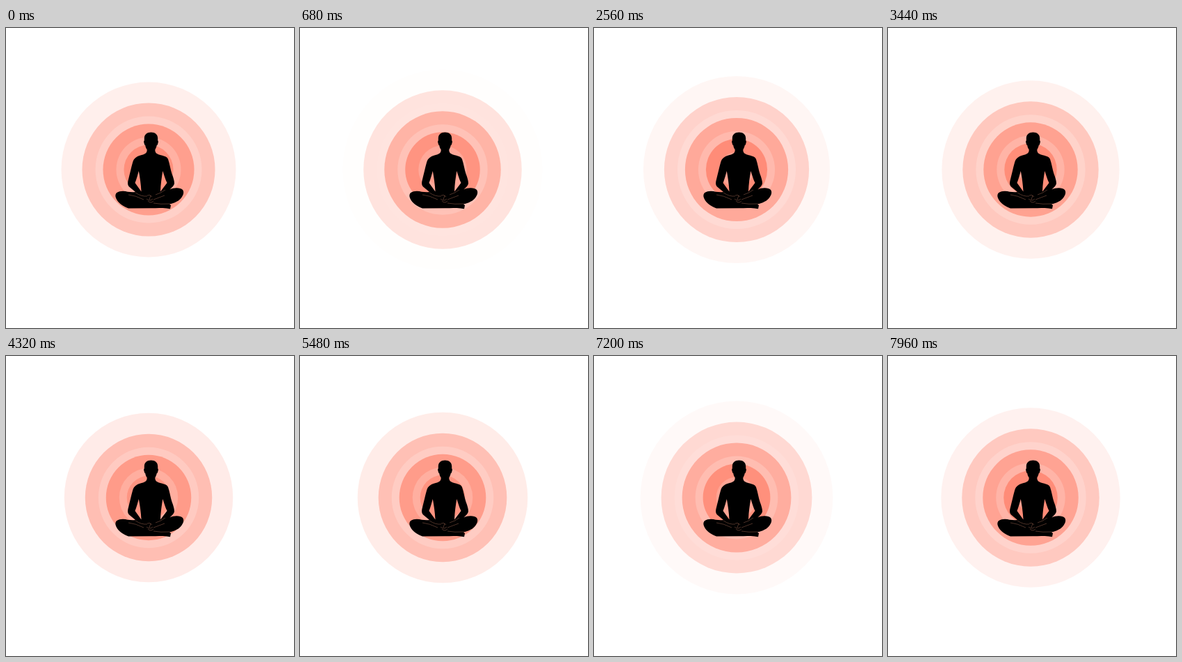
Animation, 414 px wide and 430 px high, one loop 8000 ms. Source, as an HTML page with a canvas:

```html
<!DOCTYPE html>
<html lang="en">
<head>
<meta charset="utf-8">
<title>Meditation ripples</title>
<style>
  html, body { margin: 0; width: 100%; height: 100%; overflow: hidden; background: #fff; }
  canvas { display: block; }
</style>
</head>
<body>
<canvas width="414" height="430"></canvas>
<script>
const ctx = document.querySelector('canvas').getContext('2d');
const LOOP = 8000, PERIOD = 1120;
const CENTER = [205, 203];
const GAP = 30, RIM = 19, START_RADIUS = 125.5;

// Ring opacity by radius: [radius, alpha]
const FADE = [[15, 0], [40, .52], [65, .45], [87, .36], [117, .148], [145, 0]];

const body = new Path2D(`
  M208.5 149.5 C214.5 149.5 218 152.5 218.2 158 L218.2 161 L219 163 L217.8 167.5
  L216.8 168 C216.3 171 215 173 214.3 174.5 C214.3 178.5 216 180 220 181.5
  C227 183.5 231.5 184 233 188 C235.5 195 236.5 203 238.5 209 C240.5 214 242 219 242 223
  C241.5 226 238 229 235.5 231.5 C241 228.5 251 228.5 254 232 C257 236 254 242 249.5 246
  C245 250 239 251.5 235 252.5 L237 254 L236 259.2 L231 258.5
  C222 257.5 216 258 209 258.3 L176 258.5 C168 256 159 249 157.5 242
  C156.5 236 161 234 168 233.7 C174 234 179 236 186 235
  L177 227.5 C174.5 225 174.8 221 176 217 C178 209 180 200 182 193
  C184 186 188 184 195 182 C201 180.5 202.7 178.5 202.7 174.5
  C201.5 172.5 200.6 171 200.2 168 L199.2 167.5 L198 163 L198.8 161 L198.8 158
  C199 152.5 202.5 149.5 208.5 149.5 Z
  M190.8 205 C189.5 210 187.5 217 185.5 222 L194.5 234.5 C194 224 192.5 214 190.8 205 Z
  M225.3 205 C223.8 214 222.3 224 222 234.5 L231.5 222 C229 217 227 210 225.3 205 Z`);

const creases = new Path2D(`
  M176 239 Q186 240 198 246 M186 236 Q195 242 203 241
  M215 239 Q222 237 229 232 M212 246 Q220 243 228 240
  M203 240 Q207 238 210 242 M202 245 Q207 249 211 245
  M204 248 Q208 252 212 248 M208 240 L206 246
  M212 251 Q222 253 235 252`);

function fade(radius) {
  const i = FADE.findIndex(([r]) => r > radius);
  if (i < 1) return 0;
  const [r0, a0] = FADE[i - 1], [r1, a1] = FADE[i];
  return a0 + (a1 - a0) * (radius - r0) / (r1 - r0);
}

// The pale inner bands vanish as they near the outermost ring
const paleness = radius => Math.max(0, Math.min(.19, (98 - radius) * .013));

function disc(radius, color) {
  if (radius <= 0) return;
  ctx.fillStyle = color;
  ctx.beginPath();
  ctx.arc(...CENTER, radius, 0, Math.PI * 2);
  ctx.fill();
}

function draw(now) {
  const time = now % LOOP;
  ctx.fillStyle = '#fff';
  ctx.fillRect(0, 0, 414, 430);

  const shift = (time / PERIOD % 1) * GAP;
  for (let radius = START_RADIUS + shift; radius > 0; radius -= GAP) {
    const inner = radius - RIM;
    disc(radius, `rgba(255, 99, 71, ${fade(radius)})`);
    disc(inner, `rgba(255, 255, 255, ${paleness(inner)})`);
  }

  ctx.fillStyle = '#000';
  ctx.fill(body, 'evenodd');
  ctx.strokeStyle = 'rgba(255, 165, 130, .6)';
  ctx.lineWidth = .5;
  ctx.stroke(creases);

  requestAnimationFrame(draw);
}
requestAnimationFrame(draw);
</script>
</body>
</html>
```
